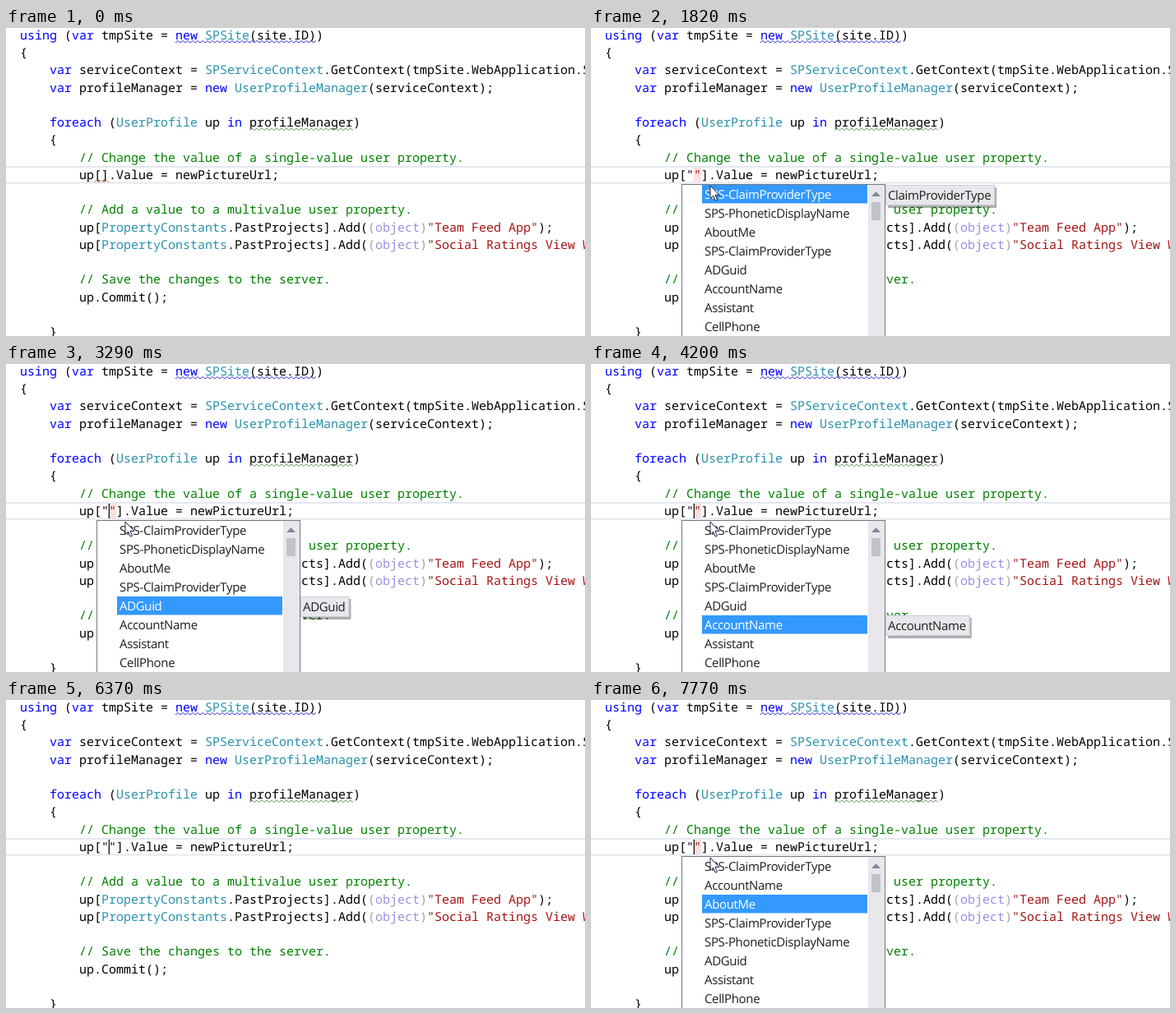
These frames come from a looping animation (704x375 px, 8000 ms). An HTML page:

```html
<!DOCTYPE html>
<html lang="en">
<head>
<meta charset="utf-8">
<title>Code completion</title>
<style>
  html, body { margin: 0; width: 100%; height: 100%; overflow: hidden; background: #fff; }
  svg { display: block; width: 704px; height: 375px; }
  text { white-space: pre; }
  .code { font: 15px "Noto Sans Mono", "DejaVu Sans Mono", monospace; fill: #000; text-rendering: geometricPrecision; }
  .list { font: 15px "Open Sans", "Noto Sans", sans-serif; letter-spacing: -.35px; fill: #1e1e1e; text-rendering: geometricPrecision; }
  .keyword { fill: #00f; }
  .type { fill: #2b91af; }
  .string { fill: #a31515; }
  .comment { fill: #008000; }
  .faded { fill: #a2a2a2; }
  .fadedKeyword { fill: #9a8fe2; }
  .wave { fill: none; stroke-width: 1; }
</style>
</head>
<body>
<svg viewBox="0 0 704 375">
  <rect width="704" height="375" fill="#fff"/>
  <path d="M0 169H704M0 188.5H704" stroke="#e6e7f1" stroke-width="2"/>
  <rect id="mark" y="170" height="18"/>
  <g id="code" class="code"></g>
  <text id="edit" class="code" x="89" y="184"></text>
  <g id="waves"></g>
  <path id="editWave" class="wave" stroke="#c98a4a"/>
  <rect id="caret" y="170" width="1.3" height="18" fill="#111"/>
  <g id="popup">
    <rect x="110.5" y="190.5" width="247" height="200" fill="#fff" stroke="#77777f"/>
    <rect x="337" y="191" width="20" height="184" fill="#e8e8ec"/>
    <path d="M341 205L346.5 199L352 205Z" fill="#868999"/>
    <rect x="341" y="212" width="11" height="22" fill="#c2c3c9"/>
    <rect id="selection" x="135" width="201" height="22.5" fill="#3399ff"/>
    <g id="rows" class="list"></g>
    <g id="tip">
      <rect id="tipShade" x="361" y="3" height="25" fill="#000" opacity=".32"/>
      <rect id="tipBox" x="358.5" y=".5" height="24" fill="#e7e8ec" stroke="#cccedb"/>
      <text id="tipText" class="list" x="361" y="18"></text>
    </g>
    <path d="M145 192V207.5L148.6 204.2L151.3 210.2L153.6 209.1L151 203.4H156Z" fill="#fff" stroke="#202040" stroke-linejoin="round"/>
  </g>
</svg>
<script>
const LOOP = 8000, CHAR = 9, PITCH = 21.24, ROW = 23;
const $ = id => document.getElementById(id);
const set = (el, attrs) => { for (const k in attrs) el.setAttribute(k, attrs[k]); };
const show = (el, on) => { el.style.display = on ? "" : "none"; };

const source = `using (var tmpSite = new SPSite(site.ID))
{
    var serviceContext = SPServiceContext.GetContext(tmpSite.WebApplication.ServiceApplicationProxyGroup);
    var profileManager = new UserProfileManager(serviceContext);

    foreach (UserProfile up in profileManager)
    {
        // Change the value of a single-value user property.


        // Add a value to a multivalue user property.
        up[PropertyConstants.PastProjects].Add((object)"Team Feed App");
        up[PropertyConstants.PastProjects].Add((object)"Social Ratings View Web Part");

        // Save the changes to the server.
        up.Commit();

    }`.split("\n");

const span = (cls, s) => `<tspan class="${cls}">${s}</tspan>`;
const token = /(\/\/.*)|("[^"]+")|\b(using|var|new|foreach|in)\b|\b(SPSite|SPServiceContext|UserProfileManager|UserProfile|PropertyConstants)\b|\(object\)/g;

function highlight(line) {
  return line.replace(token, (all, comment, string, keyword, type) =>
    comment ? span("comment", all) :
    string ? span("string", all) :
    keyword ? span("keyword", all) :
    type ? span("type", all) :
    span("faded", "(") + span("fadedKeyword", "object") + span("faded", ")"));
}

function wave(x1, x2, y) {
  let d = `M${x1} ${y}`;
  for (let x = x1 + 3, up = true; x <= x2; x += 3, up = !up) d += `L${x} ${up ? y - 2.5 : y}`;
  return d;
}

$("code").innerHTML = source.map((line, i) => {
  const body = line.trimStart();
  return `<text x="${17 + (line.length - body.length) * CHAR}" y="${14 + i * PITCH}">${highlight(body)}</text>`;
}).join("");
$("waves").innerHTML =
  `<path class="wave" stroke="#3a3ae0" d="${wave(206, 377, 18)}"/>` +
  `<path class="wave" stroke="#6f9a6f" d="${wave(296, 422, 124.5)}"/>`;
$("editWave").setAttribute("d", wave(107, 125, 188));

const names = ["SPS-ClaimProviderType", "SPS-PhoneticDisplayName", "AboutMe", "SPS-ClaimProviderType",
  "ADGuid", "AccountName", "Assistant", "CellPhone"];
const recent = [0, 5, 2, 3, 1, 4, 6, 7].map(i => names[i]);

// Each step changes part of the editor state.
const CLASS = "PropertyConstants";
const steps = [
  [0, { key: "", caret: false, list: null, row: 0, tip: "", marked: false }],
  [420, { caret: true }],
  [560, { key: '""' }],
  [770, { list: names }],
  [910, { caret: false }],
  [1260, { tip: "ClaimProviderType" }],
  [1330, { caret: true }],
  [1820, { caret: false }],
  [1890, { row: 1, tip: "" }],
  [2100, { row: 2 }],
  [2240, { row: 3 }],
  [2310, { caret: true }],
  [2450, { row: 4 }],
  [2800, { caret: false }],
  [2940, { tip: "ADGuid" }],
  [3290, { caret: true }],
  [3500, { row: 5, tip: "" }],
  [3780, { caret: false }],
  [3990, { tip: "AccountName" }],
  [4200, { caret: true }],
  [4270, { key: CLASS + ".AccountName", list: null, tip: "", marked: true }],
  [4690, { caret: false }],
  [5180, { caret: true }],
  [5250, { marked: false }],
  [5320, { key: CLASS + "." }],
  [5460, { key: CLASS }],
  [5600, { key: "" }],
  [6090, { caret: false }],
  [6370, { key: '""', caret: true }],
  [6510, { list: recent, row: 0 }],
  [6930, { caret: false }],
  [7070, { tip: "ClaimProviderType" }],
  [7420, { caret: true }],
  [7490, { row: 1, tip: "" }],
  [7770, { row: 2 }]
];

function stateAt(t) {
  return Object.assign({}, ...steps.filter(s => s[0] <= t).map(s => s[1]));
}

function draw({ key, caret, list, row, tip, marked }) {
  const quoted = key === '""';
  const shown = quoted && list ? '"' + span("string", '"') : highlight(key);
  $("edit").innerHTML = `up[${shown}].Value = newPictureUrl;`;
  show($("editWave"), !key);

  const caretX = 116 + (quoted ? 1 : key.length) * CHAR;
  show($("caret"), caret);
  set($("caret"), { x: caretX - .3 });
  show($("mark"), marked || list);
  set($("mark"), marked ? { x: 278, width: 99, fill: "#dddfd2" } : { x: 125, width: 9, fill: "#fbe0de" });

  show($("popup"), list);
  if (!list) return;
  const top = 191 + row * ROW;
  set($("selection"), { y: top });
  $("rows").innerHTML = list.map((name, i) =>
    `<text x="138" y="${208 + i * ROW}"${i === row ? ' style="fill:#fff"' : ""}>${name}</text>`).join("");
  show($("tip"), tip);
  if (!tip) return;
  $("tipText").textContent = tip;
  const width = $("tipText").getComputedTextLength() + 7;
  set($("tipBox"), { width });
  set($("tipShade"), { width });
  set($("tip"), { transform: `translate(0 ${top})` });
}

let current = -1;
function frame() {
  const t = performance.now() % LOOP;
  const step = steps.filter(s => s[0] <= t).length;
  if (step !== current) {
    current = step;
    draw(stateAt(t));
  }
  requestAnimationFrame(frame);
}
frame();
</script>
</body>
</html>
```
